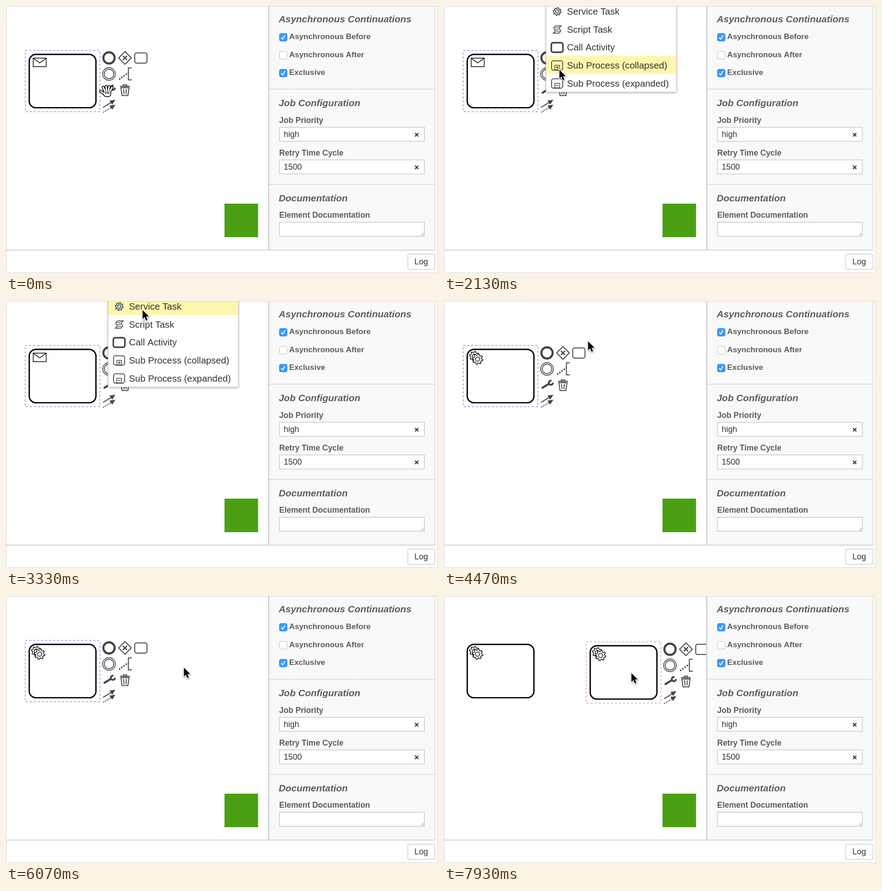
These frames come from a looping animation (952x589 px, 8 s). An HTML page with a canvas:

```html
<!DOCTYPE html>
<html lang="en">
<head>
<meta charset="utf-8">
<title>Task editor</title>
<style>
  html, body { margin: 0; width: 100%; height: 100%; overflow: hidden; background: #fff; }
  canvas { display: block; width: 952px; height: 589px; }
</style>
</head>
<body>
<canvas id="stage" width="952" height="589"></canvas>
<script>
const ctx = document.getElementById('stage').getContext('2d');
const TAU = Math.PI * 2, LOOP = 8000, STEP = 200 / 3;
const SANS = '"Liberation Sans", Arial, sans-serif';
const ICON = '#444', LABEL = '#5c5c5c', SELECTED = '#8a88f0', HOVERED = '#dc9a8c';
const ZOOM = 1.47; // diagram units to pixels

const MENU_OPEN = 1530, MENU_PICK = 3395, DESELECT = 6795, PASTE = 7395, HOVER = 7860;
const MENU = { x: 225, w: 287, top: -8.7, row: 39.7 };
const ITEMS = ['Service Task', 'Script Task', 'Call Activity',
  'Sub Process (collapsed)', 'Sub Process (expanded)'];

const smooth = k => k * k * (3 - 2 * k);
const clamp = k => Math.min(1, Math.max(0, k));

// The pointer rests, then eases to the next stop
const MOVES = [
  { from: 533, to: 800, x: 208.5, y: 186 },
  { from: 1200, to: 1333, x: 224, y: 186 },
  { from: 1933, to: 2400, x: 301, y: 71 },
  { from: 2400, to: 3333, x: 301, y: 20 },
  { from: 3933, to: 4467, x: 317.5, y: 89 },
  { from: 4467, to: 4800, x: 392, y: 154 },
  { from: 5267, to: 5800, x: 392, y: 158 },
  { from: 6400, to: 6600, x: 392, y: 170 },
  { from: 7800, to: 7933, x: 413, y: 170 }
];

function pointerAt(t) {
  let x = 221.5, y = 187;
  for (const m of MOVES) {
    const k = smooth(clamp((t - m.from) / (m.to - m.from)));
    x += (m.x - x) * k;
    y += (m.y - y) * k;
  }
  return [x, y];
}

function at(x, y, draw) {
  ctx.save();
  ctx.translate(x, y);
  draw();
  ctx.restore();
}

function paint(fill, stroke, width = 1) {
  if (fill) { ctx.fillStyle = fill; ctx.fill(); }
  if (stroke) { ctx.strokeStyle = stroke; ctx.lineWidth = width; ctx.stroke(); }
}

function box(x, y, w, h, r, fill, stroke, width) {
  ctx.beginPath();
  ctx.roundRect(x, y, w, h, r);
  paint(fill, stroke, width);
}

function trace(points, close) {
  ctx.beginPath();
  for (let i = 0; i < points.length; i += 2) ctx.lineTo(points[i], points[i + 1]);
  if (close) ctx.closePath();
}

function line(points, color, width = 1, dash = []) {
  ctx.setLineDash(dash);
  trace(points);
  paint(null, color, width);
  ctx.setLineDash([]);
}

function shape(points, fill, stroke, width) {
  trace(points, true);
  paint(fill, stroke, width);
}

function ring(x, y, r, width, color = ICON, fill) {
  ctx.beginPath();
  ctx.arc(x, y, r, 0, TAU);
  paint(fill, color, width);
}

function cross(x, y, r, width, color) {
  for (const s of [-r, r]) line([x - r, y - s, x + r, y + s], color, width);
}

function text(str, x, y, size, color, style = '') {
  ctx.font = `${style} ${size}px ${SANS}`;
  ctx.fillStyle = color;
  ctx.fillText(str, x, y);
}

function gear(x, y, r, color, width) {
  const pts = [], teeth = 8;
  for (let i = 0; i < teeth * 4; i++) {
    const a = (i + .5) * TAU / (teeth * 4);
    const d = i % 4 < 2 ? r : r * .74;
    pts.push(x + Math.cos(a) * d, y + Math.sin(a) * d);
  }
  shape(pts, '#fff', color, width);
  ring(x, y, r * .4, width, color, '#fff');
}

// Everything on a task is measured from its centre
function task(icon) {
  const w = 100 * ZOOM, h = 80 * ZOOM;
  box(-w / 2, -h / 2, w, h, 10 * ZOOM, '#fff', '#000', 2 * ZOOM);
  if (icon === 'mail') {
    box(-64.7, -50.5, 28.6, 18.6, 0, '#fff', '#000', ZOOM);
    line([-64.7, -50.5, -50.4, -40, -36.1, -50.5], '#000', ZOOM);
  } else {
    gear(-58, -44, 10.7, '#000', ZOOM);
    gear(-50.6, -37.4, 11.7, '#000', ZOOM);
  }
}

function outline(color) {
  const w = 112 * ZOOM, h = 92 * ZOOM;
  ctx.setLineDash([3 * ZOOM, 3 * ZOOM]);
  box(-w / 2, -h / 2, w, h, 0, null, color, ZOOM);
  ctx.setLineDash([]);
}

function wrench() {
  ctx.lineCap = 'round';
  line([-10, 6, 4, -2.5], ICON, 4.4);
  ctx.lineCap = 'butt';
  ctx.beginPath();
  ctx.arc(8.5, -5, 4.6, 0, TAU * .8);
  paint(null, ICON, 4);
}

function trash() {
  line([-11, -8, 11, -8], ICON, 2.2);
  box(-4, -11.5, 8, 3.5, 1, null, ICON, 2);
  shape([-9, -5, 9, -5, 6.5, 12.3, -6.5, 12.3], null, ICON, 2);
  for (const s of [-1, 1]) line([s * 2.9, -2, s * 2.2, 9], ICON, 2);
}

function flows() {
  for (const [y, dash] of [[-14, []], [-3, [2.5, 2]]]) {
    line([-13, y + 17, 5, y + 6], ICON, 2, dash);
    shape([14, y, 7, y + 11, 1, y + 2], ICON);
  }
}

function annotation() {
  line([-13, 12, 7, -2.5], ICON, 3.2, [3.2, 2.8]);
  line([15, -13.5, 7.5, -13.5, 7.5, 13, 15, 13], ICON, 2);
}

function diamond() {
  shape([0, -14, 14, 0, 0, 14, -14, 0], null, ICON, 2);
  cross(0, 0, 4.5, 2.5, ICON);
}

// Icons sit on a square grid beside the task
function contextPad() {
  const grid = [
    [() => ring(0, 0, 12.4, 4.6), diamond, () => box(-13.7, -11, 27, 22.5, 4, null, ICON, 2)],
    [() => [14, 10.5].forEach(r => ring(0, 0, r, 1.7)), annotation],
    [wrench, trash],
    [flows]
  ];
  grid.forEach((row, j) => row.forEach((icon, i) =>
    at(102.3 + i * 35.2, -51.1 + j * 35.4, icon)));
}

function checkbox(y, label, on) {
  box(602.5, y + .5, 17, 17, 3.5, on ? '#3b99fc' : '#fff', on ? '#3189ee' : '#bbb');
  if (on) line([606.5, y + 9.5, 609.7, y + 13, 615, y + 4.5], '#fff', 2);
  text(label, 624, y + 13, 17.2, LABEL, 'bold');
}

function field(y, label, value) {
  text(label, 602, y - 9.3, 17.5, LABEL, 'bold');
  box(602.5, y + .5, 319.5, 31, 0, '#fff', '#c8c8c8', 1.4);
  if (!value) return;
  text(value, 612, y + 22, 18, '#333');
  cross(905, y + 17, 3.7, 2.2, '#333');
}

function panel() {
  ctx.fillStyle = '#f9f9f9';
  ctx.fillRect(579, 0, 367, 538);
  line([579, 0, 579, 538], '#c4c4c4', 2);
  line([945.5, 0, 945.5, 538], '#ccc');

  const heading = (s, y) => text(s, 601, y, 20.9, LABEL, 'italic bold');
  heading('Asynchronous Continuations', 36);
  checkbox(60, 'Asynchronous Before', true);
  checkbox(99.5, 'Asynchronous After', false);
  checkbox(139, 'Exclusive', true);
  heading('Job Configuration', 221);
  field(267, 'Job Priority', 'high');
  field(339, 'Retry Time Cycle', '1500');
  heading('Documentation', 430.5);
  field(476.5, 'Element Documentation');
  for (const d of [3, 6]) line([920.5 - d, 506.5, 920.5, 506.5 - d], '#888');
  for (const y of [183.5, 393.5]) line([580, y, 945, y], '#b4b4b4', 1.4, [1.5, 1.5]);
}

function frameLines() {
  line([0, 538.5, 946, 538.5], '#c4c4c4', 1.4);
  box(.5, .5, 951, 588, 3, null, '#d0d0d0');
  box(885.5, 547.5, 59.5, 33.5, 2, '#fff', '#ccc', 1.4);
  text('Log', 900, 570, 18, '#333');
}

// A scroll: two wavy edges joined at top and bottom
function scrollIcon() {
  const left = [], right = [];
  for (let y = -8; y <= 8; y++) {
    const x = 2.6 * Math.sin(y * Math.PI / 8) - y * .34;
    left.push([x - 6, y]);
    right.unshift([x + 6, y]);
  }
  shape([...left, ...right].flat(), null, ICON, 1.8);
  for (const y of [-4, 0, 4]) line([y * .3 - 4, y, y * .3 + 4, y], ICON, 1.4);
}

function subProcess(collapsed) {
  box(-12.5, -10.3, 24.5, 20.6, 4, null, ICON, 1.8);
  box(-5.3, -.5, 10.5, 10, 0, null, ICON, 1.4);
  line([-3.2, 4.5, 3.2, 4.5], ICON, 1.5);
  if (collapsed) line([0, 1.2, 0, 7.8], ICON, 1.5);
}

const MENU_ICONS = [
  () => gear(0, 0, 8.7, ICON, 1.8),
  scrollIcon,
  () => box(-13, -10.5, 25.5, 21, 4, null, ICON, 3.4),
  () => subProcess(true),
  () => subProcess(false)
];

function menu(px, py) {
  const { x, w, top, row } = MENU, bottom = top + row * ITEMS.length;
  ctx.save();
  ctx.shadowColor = 'rgba(0,0,0,.4)';
  ctx.shadowBlur = 5;
  ctx.shadowOffsetY = 1;
  ctx.fillStyle = '#fff';
  ctx.fillRect(x, -20, w, bottom + 20);
  ctx.restore();
  const active = px > x ? Math.floor((py - top) / row) : -1;
  ITEMS.forEach((label, i) => {
    const y = top + i * row;
    if (i === active) {
      ctx.fillStyle = '#fef6ac';
      ctx.fillRect(x, Math.round(y), w, row);
    }
    at(249.5, y + row / 2 + 1, MENU_ICONS[i]);
    text(label, 271, y + 27.7, 20.4, '#333');
  });
  line([x, 0, x, bottom, x + w, bottom, x + w, 0], '#ccc');
}

function arrowCursor() {
  const pts = [0, 0, 0, 19.5, 4.4, 15.4, 7.6, 23, 11, 21.5, 7.9, 14.2, 14, 14];
  ctx.save();
  ctx.shadowColor = 'rgba(0,0,0,.35)';
  ctx.shadowBlur = 3;
  ctx.shadowOffsetY = 1.5;
  shape(pts, '#fff', '#fff', 2.6);
  ctx.restore();
  shape(pts, '#000');
}

// Thumb and four fingers fan out from a rounded palm
function handCursor() {
  ctx.lineCap = 'round';
  for (const [color, width] of [['#000', 6.4], ['#fff', 3.2]]) {
    for (let i = -1; i < 4; i++) {
      const x = i * 3.4 - 3, y = i < 0 ? 6 : 2;
      const a = (i - 1.4) * .3 - (i < 0 ? .2 : 0);
      const reach = i < 0 ? 8 : 12 - Math.abs(i - 1.5);
      line([x, y, x + Math.sin(a) * reach, y - Math.cos(a) * reach], color, width);
    }
    box(-4, 2, 11, 8.5, 3, color, color, width);
  }
  ctx.lineCap = 'butt';
  for (const x of [-2, 1.5, 5]) line([x, 1, x, 7], '#000', 1.5);
}

function draw(now) {
  const t = Math.floor((now % LOOP + 4) / STEP) * STEP;
  const [px, py] = pointerAt(t);
  const menuOpen = t >= MENU_OPEN && t < MENU_PICK;

  ctx.fillStyle = '#fff';
  ctx.fillRect(0, 0, 952, 589);

  at(124.7, 165.6, () => {
    task(t < MENU_PICK ? 'mail' : 'gears');
    if (t >= DESELECT) return;
    outline(SELECTED);
    contextPad();
  });
  if (t >= PASTE) at(395.7, 168.6, () => {
    task('gears');
    outline(t < HOVER ? SELECTED : HOVERED);
    contextPad();
  });

  ctx.fillStyle = '#4aa012';
  ctx.fillRect(481.5, 436, 74, 74);

  if (menuOpen) menu(px, py);
  panel();
  frameLines();

  const overPad = px > 216 && px < (menuOpen ? MENU.x : 245) && py > 170;
  at(px, py, overPad ? handCursor : arrowCursor);
}

const start = performance.now();
function tick() {
  draw(performance.now() - start);
  requestAnimationFrame(tick);
}
tick();
</script>
</body>
</html>
```
